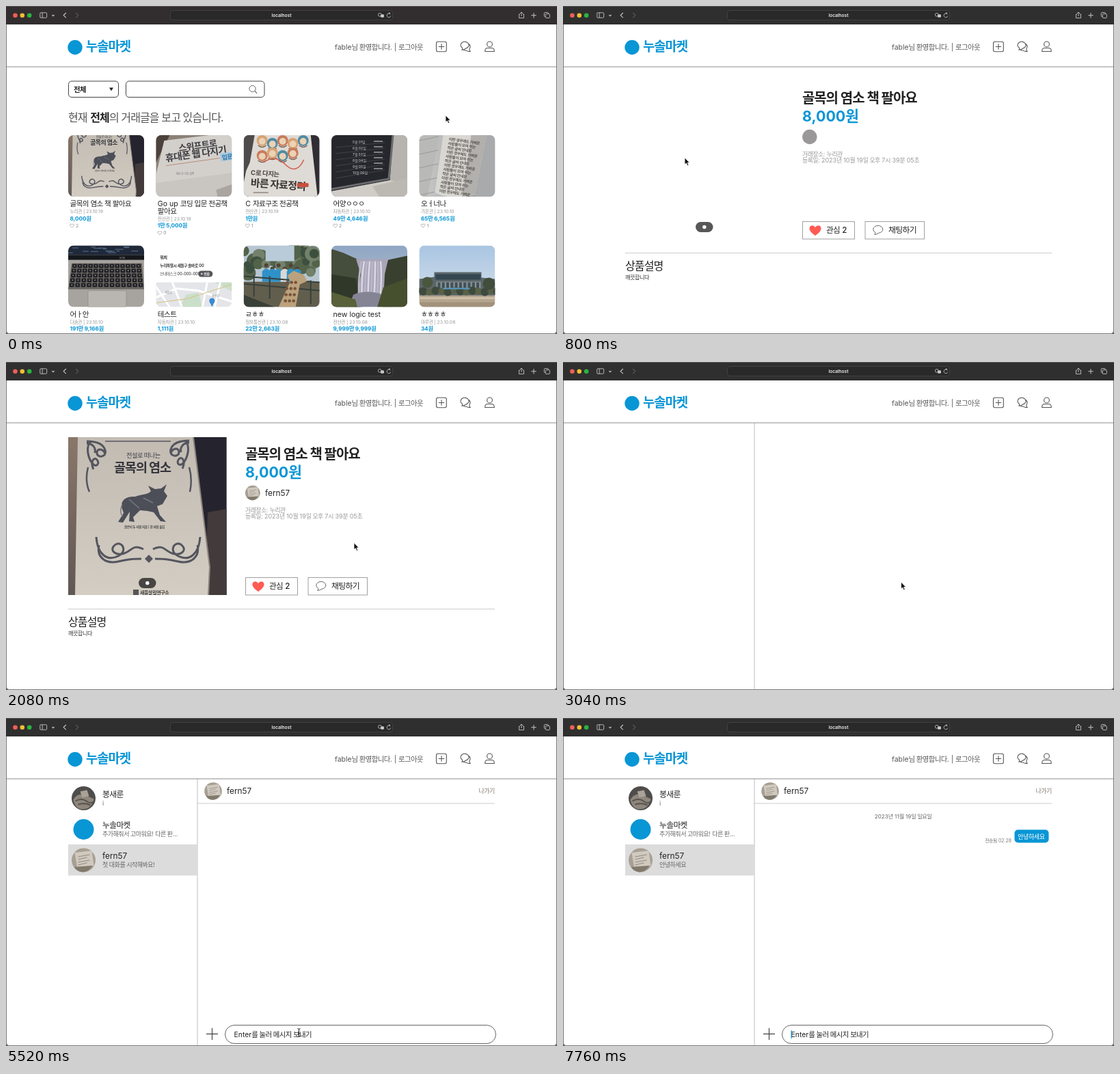
Recreate the animation shown at these times as an HTML page. Size 806x480 px, loop 8 s.

```html
<!DOCTYPE html>
<html lang="ko">
<head>
<meta charset="utf-8">
<title>누솔마켓</title>
<style>
html, body { margin: 0; width: 100%; height: 100%; overflow: hidden; background: #fff; }
svg { display: block; font-family: Inter, "Noto Sans CJK KR", "Noto Sans KR", "Noto Sans CJK JP", sans-serif; }
.ko { letter-spacing: -.055em; }
</style>
</head>
<body>
<svg id="stage" width="806" height="480" viewBox="0 0 806 480"></svg>
<script>
const BLUE = '#0896d5', SHOP = '누솔마켓', SELLER = 'fern57', MESSAGE = '안녕하세요';

// Drawing helpers
const hangul = s => s.replace(/[ㄱ-ㅣ가-힣]+( [ㄱ-ㅣ가-힣]+)*/g, '<tspan class="ko">$&</tspan>');
const text = (x, y, s, size, fill = '#222', weight = 400, extra = '') =>
  `<text x="${x}" y="${y}" font-size="${size}" fill="${fill}" font-weight="${weight}" ${extra}>${hangul(s)}</text>`;
const rect = (x, y, w, h, fill, extra = '') =>
  `<rect x="${x}" y="${y}" width="${w}" height="${h}" fill="${fill}" ${extra}/>`;
const circle = (x, y, r, fill, extra = '') => `<circle cx="${x}" cy="${y}" r="${r}" fill="${fill}" ${extra}/>`;
const shape = (d, fill, extra = '') => `<path d="${d}" fill="${fill}" ${extra}/>`;
const line = (d, color, width = 1, extra = '') =>
  `<path d="${d}" fill="none" stroke="${color}" stroke-width="${width}" ${extra}/>`;
const group = (transform, body, extra = '') => `<g transform="${transform}" ${extra}>${body}</g>`;
const layer = (id, body) => `<g id="${id}">${body}</g>`;
const repeat = (n, fn) => Array.from({ length: n }, (_, i) => fn(i)).join('');
const random = seed => () => (seed = seed * 16807 % 2147483647) / 2147483647;
const gradient = (id, from, to, across) =>
  `<linearGradient id="${id}" x2="${across ? 1 : 0}" y2="${across ? 0 : 1}"><stop stop-color="${from}"/><stop offset="1" stop-color="${to}"/></linearGradient>`;

const heart = (x, y, s, extra) => group(`translate(${x} ${y}) scale(${s})`,
  `<path d="M0 8C-5 4-9 1-9-3.2C-9-8-2.5-9.5 0-4.5C2.5-9.5 9-8 9-3.2C9 1 5 4 0 8Z" ${extra}/>`);

// Photos
function bullBook() {
  const ink = '#54555e';
  const curl = 'M0 0c12 0 24 2 27 13s-12 12-12 4 10-6 12 2M6 0c-8 8-4 24 2 32s12 0 7-5-10 4-5 14M0 3c8 0 14 6 12 14';
  const foot = 'M0 0c2 26 16 36 32 28s4-24-5-16 2 16 14 12 12-14 28-6M4 12c-4 18 10 28 28 24s24-4 34-4';
  const corner = (x, y, flip, d) => group(`translate(${x} ${y}) scale(${flip} 1)`, line(d, ink, 3));
  return rect(0, 0, 232, 231, 'url(#wood)') +
    shape('M176 0H232V231H204Z', '#25242e') + shape('M204 110L232 105V231H200Z', '#433a3b') +
    shape('M14 0H183L207 190L205 231H10Z', 'url(#cover-tone)') +
    line('M183 0L207 190L205 231', '#8d8580', 2) +
    corner(27, 6, 1, curl) + corner(177, 5, -1, curl) + line('M54 6H150', ink, 1.5) +
    line('M29 44Q24 64 31 80M177 44Q182 62 178 80', ink, 2.5) +
    text(85, 30, '전설로 떠나는', 9.2, '#3f3f46', 500) +
    text(67, 51, '골목의 염소', 18.5, '#34343b', 800) +
    shape('M78 102C77 91 86 86 98 87C108 83 115 85 121 79L117 71L127 76L136 75L144 69L140 79L145 86L138 98L130 101L134 114L143 124L135 123L125 110L116 108L105 107L95 117L97 124L89 123L90 109L80 125L73 124L81 111Z', '#4c4f58') +
    line('M79 98Q74 111 80 116M89 91L104 104M110 89L124 96', '#777a82', 1.5) +
    text(82, 133, '글쓴이 두 사람 지음 | 한 사람 옮김', 4.5, '#444', 600) +
    corner(41, 146, 1, foot) + corner(193, 146, -1, foot) +
    shape('M112 178L118 172L124 178L118 184Z', ink) +
    rect(95, 223, 8, 8, '#555') + text(105, 230, '새들살림연구소', 7, '#444', 700);
}

const photos = [
  () => group('translate(0 -10.5) scale(.48)', bullBook()),
  () => rect(0, 0, 111, 90, '#8b8177') + shape('M0 0H20L0 40Z', '#4c423b') +
    shape('M12 8L111 -4V90H0V58Z', '#d3d0cc') + shape('M0 70L111 55V90H0Z', '#c9c6c2') +
    group('rotate(-8 40 26)', text(34, 23, '스위프트로', 13, '#3d3d42', 700) +
      text(13, 35, '휴대폰 웹 다지기', 14, '#3d3d42', 700) +
      line('M12 41H92', '#b98e78', 1) + rect(93, 34, 20, 12, '#a9c9de') + text(95, 44, '입문', 9, '#2d75a8', 700)) +
    text(29, 58, '새로 쓴 기초 설명', 4, '#777') + shape('M88 80L111 72V90H90Z', '#aaa5a1'),
  () => rect(0, 0, 111, 90, '#302e32') + shape('M13 0H98L108 90H0V70Z', '#dedad5') +
    shape('M0 0H16L9 40L0 60Z', '#4f4b4c') +
    repeat(9, i => {
      const x = 27 + i % 5 * 15, y = 8 + (i / 5 | 0) * 18 + i % 2 * 4;
      return circle(x, y, 8, ['#d8a274', '#4f8ba3', '#c97c5c'][i % 3]) + circle(x, y + 1, 5, '#ead2b5') +
        line(`M${x - 6} ${y + 7}q6 5 12 0`, '#7a6252', 1.5);
    }) +
    line('M29 40Q45 27 61 43T88 36', '#cf5c48', 1.5) +
    group('rotate(4 40 60)', text(10, 60, 'C로 다지는', 9.5, '#4b4340', 700) +
      text(11, 77, '바른 자료정리', 15, '#3b3534', 800)) +
    rect(78, 70, 17, 6, '#c8513e', 'rx="2"') + rect(14, 83, 22, 2, '#a29b94'),
  () => rect(0, 0, 111, 90, '#8d8c8b') + shape('M0 0H90L86 66L0 82Z', '#25272c') +
    shape('M90 0H111V90H84Z', '#b7b4b0') + shape('M0 82L86 66L111 72V90H0Z', '#d0ccc7') +
    line('M0 79L84 64L90 0', '#6b6b6d', 3) +
    repeat(6, i => line(`M6 ${18 + i * 9}L78 ${11 + i * 8}`, '#4c4e54', .7) +
      text(31, 12 + i * 9, `${5 + i}월 0${i + 1}일`, 5, '#bcbcc0', 500) + rect(62, 8 + i * 8, 13, 2, '#7f8288')) +
    shape('M60 75L111 63V90H70Z', '#bcb8b2'),
  () => rect(0, 0, 111, 90, 'url(#silver)') + shape('M0 0H30L12 90H0Z', '#b9b9b7') +
    repeat(5, i => line(`M0 ${8 + i * 20}L28 ${2 + i * 20}`, '#989998', 1)) +
    shape('M35 0H99L82 87Q45 96 23 84Z', '#d9d7d2') +
    shape('M76 0H99L82 87L63 90Z', '#b2b0ad') +
    group('rotate(8 50 45)', repeat(13, i => text(38 - i * .3, 9 + i * 6.4,
      ['이런 경우에도 가벼운', '사람들이 모여 쉬는', '작은 글씨 안내문'][i % 3], 5.6, '#55524f', 600))) +
    shape('M99 0H111V90H82Z', '#a8aaab'),
  () => {
    const next = random(7);
    return rect(0, 0, 111, 90, '#a7a49f') + rect(0, 0, 111, 14, '#20293a') + rect(0, 14, 111, 7, '#15171b') +
      text(75, 19, 'note', 4, '#999') + repeat(16, () => rect(next() * 100, next() * 11, 4 + next() * 9, 1, '#56708c')) +
      shape('M5 26H108L111 64H0Z', '#68645f') +
      repeat(5, r => repeat(13, k => rect(6 - r + k * (7.8 + r * .15), 27 + r * 7, 6.6, 5.8, '#202126', 'rx="1"') +
        rect(8.5 - r + k * (7.8 + r * .15), 29 + r * 7, 1.6, 1.4, '#a5a5a5'))) +
      rect(29, 66, 56, 24, '#b9b6b1', 'rx="2" stroke="#88847e" stroke-width=".6"');
  },
  () => rect(0, 0, 111, 90, '#fff') + text(6, 19, '위치', 6, '#222', 700) +
    text(6, 31, '누리특별시 새들구 솔바로 00', 5.6, '#333', 600) + text(6, 43, '안내데스크 00-000-0000', 5.5, '#444', 500) +
    rect(62, 37, 21, 9, '#55565a', 'rx="4.5"') + text(70, 43.4, '전화', 4.8, '#fff', 600) + circle(67, 41.5, 1.3, '#ddd') +
    rect(0, 54, 111, 36, '#e4e5e8') + shape('M35 90L44 72L62 69L68 90Z', '#cadfc9') + shape('M86 54H111V67Z', '#cadfc9') +
    line('M0 76L30 63L62 66L111 82M24 54L38 90M75 54L68 90M0 60L20 90M94 54L86 90', '#fff', 3) +
    line('M0 84L45 78L111 57', '#d5c58a', 1.2) + text(13, 70, '새들길', 4, '#75797f') + text(82, 75, '솔바길', 4, '#75797f') +
    circle(82, 81, 4, '#3888d2') + shape('M79 83L82 90L85 83Z', '#3888d2'),
  () => {
    const next = random(31);
    return rect(0, 0, 111, 90, '#b7c6d1') +
      repeat(42, () => circle(next() * 111, 5 + next() * 36, 5 + next() * 7, ['#53634a', '#74816a', '#3d5040'][next() * 3 | 0])) +
      rect(32, 0, 42, 23, '#b9cbd8') + rect(0, 53, 111, 37, '#625e4e') +
      repeat(6, i => circle(33 + i * 9, 29 + i % 2 * 5, 3, '#514239') +
        shape(`M${27 + i * 9} 53V38q6-8 12 0V53Z`, i % 4 === 3 ? '#d9d9d6' : '#2f91c8')) +
      line('M0 45L111 54M0 56L111 66M15 43V75M38 45V78M98 51V86', '#36403b', 2) +
      shape('M51 90L68 53L64 44L73 37L88 43L93 52L82 57L76 90Z', '#bca27c') +
      repeat(12, i => circle(64 + i % 3 * 6 - (i / 3 | 0), 54 + (i / 3 | 0) * 9, 2.3, '#76533a')) +
      shape('M0 72L45 90H0Z', '#394038');
  },
  () => rect(0, 0, 111, 90, 'url(#sky)') + shape('M0 5L18 11L38 20L47 28L42 90H0Z', '#454d3c') +
    shape('M111 15L83 21L77 36L75 90H111Z', '#39402f') + shape('M0 42L36 48L45 90H0Z', '#303829') +
    shape('M36 20L83 20L78 42L76 80H37L43 42Z', '#a9a5b7') +
    repeat(8, i => line(`M${44 + i * 4} 23Q${39 + i * 5} 45 ${40 + i * 4.5} 74`, i % 2 ? '#d9d8e3' : '#bbb6ca', 2.5)) +
    shape('M32 72Q58 62 83 76L88 90H25Z', '#858495') + shape('M76 61L111 48V90H67Z', '#46502f') +
    shape('M0 68L35 79L38 90H0Z', '#586139'),
  () => rect(0, 0, 111, 90, 'url(#pale)') + rect(0, 70, 111, 20, '#b6a58e') +
    shape('M0 49L22 46V39H91V47L111 49V73H0Z', '#5b666b') + rect(24, 42, 66, 8, '#354751') +
    rect(25, 53, 65, 17, '#8a9294') + repeat(10, i => rect(27 + i * 6.3, 54, 4, 14, '#405059')) +
    repeat(14, i => circle(i * 9 - 3, 66 + i % 3, 5 + i % 2, i % 2 ? '#3e4b3c' : '#596047')) +
    circle(12, 54, 8, '#4b563f') + circle(102, 56, 9, '#424d3b') +
    line('M35 63H74', '#5b9bc6', 2) + line('M0 77H111', '#cdbfa9', 3) + rect(0, 83, 111, 7, '#a2927c')
];

const sellerFace = (x, y, r) => group(`translate(${x} ${y}) scale(${r / 17.5})`,
  circle(0, 0, 17.5, '#a89f94') + shape('M-13-11L12-14L15 8L-9 13Z', '#d0c9be') +
  repeat(4, i => line(`M-8 ${-5 + i * 4}L${9 - i % 2 * 4} ${-8 + i * 4}`, '#918982', 1)) +
  shape('M-14 10L13 8Q7 18-2 17.4Q-10 17-14 10Z', '#817a6c'));
const rockFace = (x, y) => group(`translate(${x} ${y})`,
  circle(0, 0, 17.5, '#4e4d4b') + shape('M-15 2Q-9-8 0-5T15 1Q12 15 0 16T-15 2Z', '#8e867c') +
  line('M-12 4Q-3-1 4 4T14 5M-8 9Q2 6 10 10', '#57524d', 2) + shape('M-5-10L5-12L8-3L-2-1Z', '#aaa197'));

// Pages
const items = [
  ['골목의 염소 책 팔아요', '누리관 | 23.10.19', '8,000원', 2],
  ['Go up 코딩 입문 전공책', '전산관 | 23.10.19', '1만 5,000원', 0, '팔아요'],
  ['C 자료구조 전공책', '전산관 | 23.10.19', '1만원', 1],
  ['어양ㅇㅇㅇ', '자동차관 | 23.10.10', '49만 4,646원', 2],
  ['오ㅓ너나', '가온관 | 23.10.10', '65만 6,565원', 1],
  ['어ㅏ안', '다솜관 | 23.10.10', '191만 9,166원', 0],
  ['테스트', '자동차관 | 23.10.10', '1,111원', 0],
  ['ㄹㅎㅎ', '정보통신관 | 23.10.08', '22만 2,663원', 0],
  ['new logic test', '전산관 | 23.10.08', '9,999만 9,999원', 0],
  ['ㅎㅎㅎㅎ', '마루관 | 23.10.08', '34원', 0]
];

function itemCard([title, meta, price, likes, more], i) {
  const drop = more ? 10.7 : 0;
  return group(`translate(${91 + i % 5 * 128.35} ${189 + (i / 5 | 0) * 161.5})`,
    `<g clip-path="url(#thumb)">${photos[i]()}</g>` +
    text(2.5, 104, title, 10.6) + (more ? text(2.5, 114.7, more, 10.6) : '') +
    group(`translate(0 ${drop})`, text(2.5, 114.3, meta, 6.8, '#999') + text(2.5, 124.7, price, 8.1, BLUE, 700) +
      heart(5.6, 132.5, .33, 'fill="none" stroke="#999" stroke-width="2.2"') + text(11, 134.6, '' + likes, 6.8, '#888')));
}

const speech = (x, y) => line(`M${x - 3.6} ${y + 4.4}A7 5.5 0 1 1 ${x + 1} ${y + 5.3}Q${x - 2} ${y + 8} ${x - 5} ${y + 7.3}Q${x - 3} ${y + 6} ${x - 3.6} ${y + 4.4}Z`, '#666', 1);

const chrome = rect(0, 0, 806, 27, '#2f2f2f', 'id="bar"') + line('M0 .5H806', '#555') +
  circle(13.5, 13.7, 3.3, '#ee6058') + circle(23.8, 13.7, 3.3, '#f3bd35') + circle(34.2, 13.7, 3.3, '#2bb640') +
  line('M51 9.8H58.5Q59.7 9.8 59.7 11V16Q59.7 17.2 58.5 17.2H51Q49.8 17.2 49.8 16V11Q49.8 9.8 51 9.8ZM53.2 10V17', '#c4c4c4', .9) +
  line('M67.4 13L69 14.6L70.6 13M87.8 10L84.2 13.6L87.8 17.2', '#c8c8c8', 1.1) +
  line('M102.2 10L105.8 13.6L102.2 17.2', '#595959', 1.1) +
  rect(240.5, 6.5, 325, 14, '#292929', 'rx="3.5" stroke="#414141"') +
  text(403, 16.2, 'localhost', 6.6, '#f2f2f2', 600, 'text-anchor="middle"') +
  circle(546.8, 12.8, 2.4, 'none', 'stroke="#bbb" stroke-width=".9"') + rect(548, 12.3, 5, 4.4, '#c8c8c8', 'rx="1.4"') +
  line('M562.5 12.3A2.9 2.9 0 1 0 562.8 14.6M559.5 10.8L561.8 11L560.5 9', '#bbb', .9) +
  line('M752 12H750.5V17.5H757.5V12H756M754 15V9M752 11L754 9L756 11', '#c4c4c4', .9) +
  line('M772 10V17.5M768.3 13.7H775.7', '#c4c4c4', 1) +
  rect(787.3, 9.5, 6, 6, 'none', 'rx="1" stroke="#c4c4c4" stroke-width=".9"') +
  rect(789.3, 11.5, 6, 6, '#2f2f2f', 'rx="1" stroke="#c4c4c4" stroke-width=".9"');

const header = circle(101, 60.5, 10.7, BLUE) + text(117, 66.4, SHOP, 18.8, BLUE, 900) +
  text(481, 64, 'fable님 환영합니다. | 로그아웃', 10.4, '#555') +
  rect(629.5, 52.3, 14.8, 14.4, 'none', 'rx="2.2" stroke="#555" stroke-width="1.1"') +
  line('M637 55.3V63.7M632.8 59.5H641.2', '#555', 1.1) +
  line('M667.5 61.3A6 5 0 1 1 672.5 62.1Q670 64.5 667 64Q668.3 62.8 667.5 61.3ZM677 55.5Q680.5 58.5 678 62.5Q677.5 65 679 66.5Q676 67 674 65.3Q670.5 65.5 669 63.8', '#555', 1.1) +
  circle(707.5, 55.9, 3.9, 'none', 'stroke="#555" stroke-width="1.1"') +
  line('M700.7 66.5Q700.5 61.5 704.5 61.5H710.5Q714.5 61.5 714.3 66.5Z', '#555', 1.1) + line('M0 89H806', '#8c8c8c');

const listPage = rect(91.5, 110, 73, 23.5, '#fff', 'rx="4.5" stroke="#444"') + text(99, 125.6, '전체', 10.4, '#222', 600) +
  shape('M151 119.5H157L154 124.3Z', '#222') + rect(175.5, 110, 202.5, 23.5, '#fff', 'rx="4.5" stroke="#444"') +
  circle(360.5, 121, 4.6, 'none', 'stroke="#666"') + line('M364 124.5L367.2 127.8', '#666', 1.1) +
  text(91, 169.2, '현재 <tspan fill="#222" font-weight="700">전체</tspan>의 거래글을 보고 있습니다.', 16, '#555') +
  items.map(itemCard).join('');

const detailPage =
  layer('cover', group('translate(91 110)', bullBook(), 'clip-path="url(#square)"')) +
  rect(194, 316, 25.5, 15, '#000', 'rx="7.5" opacity=".66"') + circle(206.8, 323.5, 2.7, '#fff') +
  text(350, 141.8, '골목의 염소 책 팔아요', 20, '#222', 600) + text(350, 168.6, '8,000원', 21.4, BLUE, 700) +
  circle(360.8, 191.5, 10.7, '#9b9899') + layer('seller', sellerFace(360.8, 191.5, 10.7) + text(379, 196, SELLER, 11.8)) +
  text(350, 219.6, '거래장소: 누리관', 8.9, '#999') + text(350, 228.8, '등록일: 2023년 10월 19일 오후 7시 39분 05초', 8.9, '#999') +
  rect(350.5, 315.5, 76, 25.5, '#fff', 'stroke="#a0a0a0"') + heart(369, 328.5, .95, 'fill="#ff5b54"') +
  text(385, 332.3, '관심 2', 11.6, '#222', 500) +
  rect(442, 315.5, 86.5, 25.5, '#fff', 'stroke="#a0a0a0"') + speech(460.5, 327) + text(476, 332.3, '채팅하기', 11.9, '#222', 500) +
  line('M91 361.5H715', '#ccc') + text(91, 385.8, '상품설명', 16, '#222', 500) + text(91, 399.5, '깨끗합니다', 8.1, '#333');

const room = (y, name, note) => text(141, y, name, 11.8) + text(141, y + 12.4, note, 9, '#666');
const chatPage = line('M280 89V480', '#bdbdbd') +
  layer('rooms', rect(91, 185, 188.5, 45.5, '#dcdcdc') + room(115.8, '봉새룬', 'i') +
    room(161, SHOP, '추가해줘서 고마워요! 다른 판...') + room(206, SELLER, '') +
    layer('firstNote', text(141, 218.4, '첫 대화를 시작해봐요!', 9, '#666')) +
    sellerFace(113.5, 208, 17.5) + sellerFace(303, 107, 12.8) + text(323, 111.2, SELLER, 11.8) +
    text(715, 110.2, '나가기', 9.1, '#857d70', 500, 'text-anchor="end"') + line('M280 125H715', '#ccc') +
    line('M301.5 453.8V471M293 462.4H310', '#444', 1.2) + rect(320.5, 449.5, 396, 27, '#fff', 'rx="13.5" stroke="#666"') +
    layer('hint', text(333.5, 466.8, 'Enter를 눌러 메시지 보내기', 10.4)) +
    text(333.5, 466.8, '', 10.4, '#222', 400, 'id="typed" class="ko"') + rect(333.5, 457, 1.2, 12, BLUE, 'id="caret"')) +
  layer('faces', rockFace(113.5, 117.5) + circle(113.5, 163, 15, BLUE)) +
  layer('sent', text(141, 218.4, MESSAGE, 9, '#666') +
    text(497.5, 147, '2023년 11월 19일 일요일', 8.1, '#666', 400, 'text-anchor="middle"') +
    text(656, 181.6, '전송됨 02:28', 6.9, '#777', 400, 'text-anchor="end"') +
    rect(660.5, 163.5, 50, 19, BLUE, 'rx="5"') + text(665.2, 176.6, MESSAGE, 9.1, '#fff'));

const stage = document.getElementById('stage');
stage.innerHTML = '<defs>' + gradient('wood', '#8a776a', '#605754') + gradient('cover-tone', '#c2bbb2', '#d4cdc3') +
  gradient('silver', '#cbcbc9', '#92959a', true) + gradient('sky', '#8fa6c4', '#c0c5cf') + gradient('pale', '#a9c5e2', '#dae3ec') +
  '<clipPath id="thumb"><rect width="111" height="90" rx="8"/></clipPath><clipPath id="square"><rect width="231.5" height="231"/></clipPath></defs>' +
  rect(0, 0, 806, 480, '#fff') + layer('list', listPage) + layer('detail', detailPage) + layer('chat', chatPage) + header + chrome +
  line('M.5 27V474Q.5 479.5 6 479.5H800Q805.5 479.5 805.5 474V27', '#777') +
  shape('M0 474V480H6Q0 480 0 474ZM806 474V480H800Q806 480 806 474Z', '#555') +
  layer('arrow', shape('M0 0V10L2.3 8L4 11.8L5.8 11L4.1 7.4H7.2Z', '#111', 'stroke="#fff" stroke-width=".8"')) +
  layer('beam', line('M-2-5.5Q0-5.5 0-4Q0-5.5 2-5.5M0-4V5M-2 6.5Q0 6.5 0 5Q0 6.5 2 6.5M-1.2 1.5H1.2', '#222', 1));

// Timeline
const STEP = 80, LOOP = 8000;
const OPEN_ITEM = 640, ITEM_LOADED = 960, OPEN_CHAT = 2800, ROOMS_LOADED = 3280, FACES_LOADED = 3600;
const FOCUS = 5680, TYPE = 5920, SEND = 7040;
const strokes = 'ㅇ 아 안 안ㄴ 안녀 안녕 안녕ㅎ 안녕하 안녕핫 안녕하세 안녕하셍 안녕하세요'.split(' ');
const path = [[0, 643, 160], [560, 178, 222], [960, 178, 222], [1760, 506, 246], [2080, 509, 264.5],
  [2560, 495, 322], [3040, 494.5, 322], [3520, 479, 347.5], [3920, 479, 347.5], [4880, 428.5, 460], [LOOP, 428.5, 460]];

const byId = id => document.getElementById(id);
const show = (id, on) => byId(id).style.display = on ? '' : 'none';

function pointerAt(t) {
  const i = path.findIndex(p => p[0] > t), [t0, x0, y0] = path[i - 1], [t1, x1, y1] = path[i];
  const k = (t - t0) / (t1 - t0), e = k * k * (3 - 2 * k);
  return [x0 + (x1 - x0) * e, y0 + (y1 - y0) * e];
}

function draw(time) {
  const t = Math.floor(time % LOOP / STEP) * STEP;
  show('list', t < OPEN_ITEM);
  show('detail', t >= OPEN_ITEM && t < OPEN_CHAT);
  show('cover', t >= ITEM_LOADED);
  show('seller', t >= ITEM_LOADED);
  show('chat', t >= OPEN_CHAT);
  show('rooms', t >= ROOMS_LOADED);
  show('faces', t >= FACES_LOADED);
  show('sent', t >= SEND);
  show('firstNote', t < SEND);
  byId('bar').setAttribute('fill', t < OPEN_ITEM ? '#322d2e' : '#2f2f2f');

  const typing = t >= TYPE && t < SEND;
  const typed = byId('typed');
  typed.textContent = typing ? strokes[Math.min(strokes.length - 1, (t - TYPE) / STEP)] : '';
  show('hint', !typing);
  show('caret', t >= FOCUS);
  byId('caret').setAttribute('x', 333.5 + (typing ? typed.getComputedTextLength() : 0));

  const [x, y] = pointerAt(t), overInput = y > 450;
  show('arrow', !overInput);
  show('beam', overInput && t < TYPE);
  for (const id of ['arrow', 'beam']) byId(id).setAttribute('transform', `translate(${x} ${y})`);
}

function tick() {
  draw(performance.now());
  requestAnimationFrame(tick);
}
tick();
</script>
</body>
</html>
```
